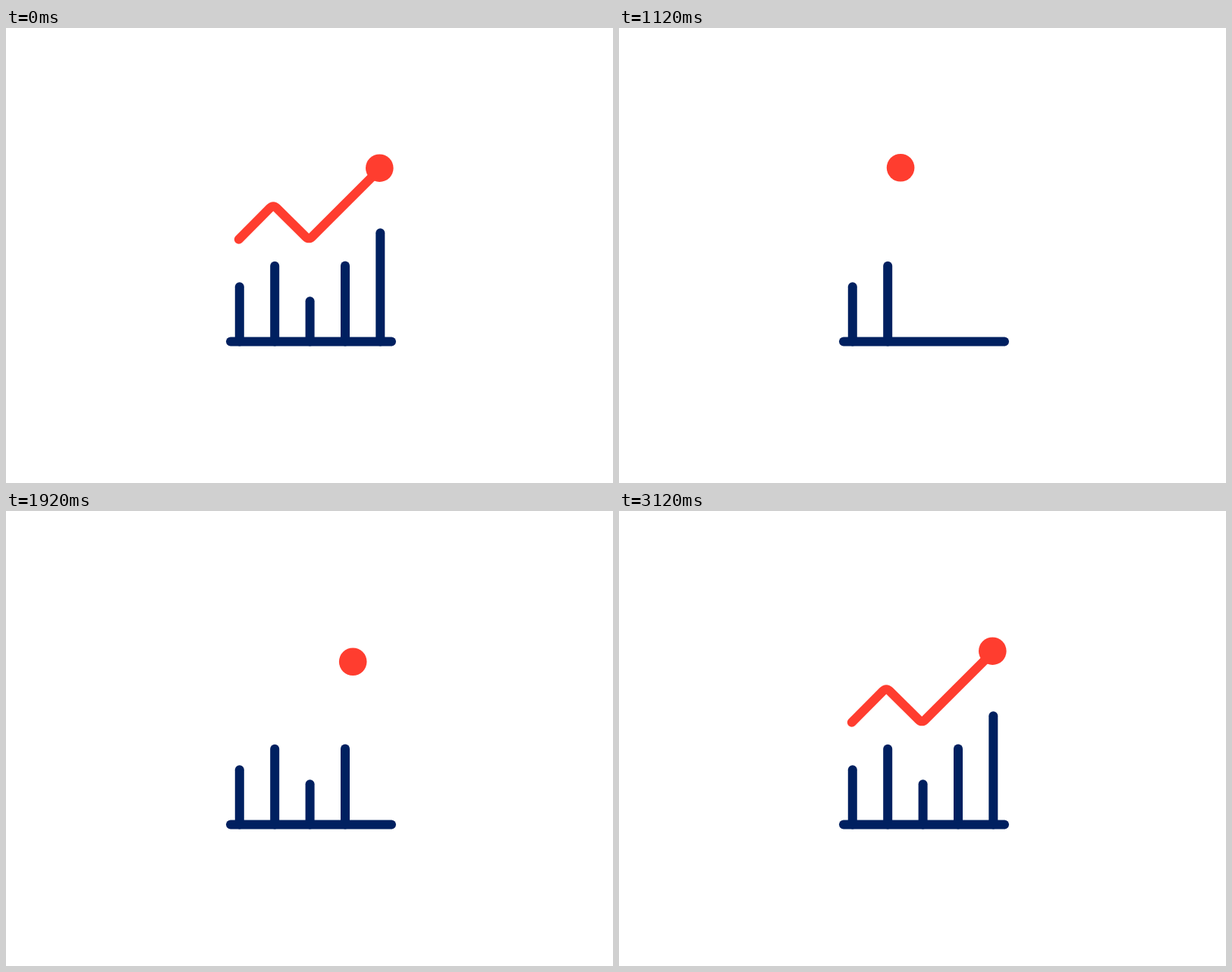
Animation, 800 px wide and 600 px high, one loop 3.48 s. Source, as an HTML page:

```html
<!DOCTYPE html>
<html lang="en">
<head>
<meta charset="utf-8">
<title>Growing chart</title>
<style>
  html, body { margin: 0; width: 100%; height: 100%; overflow: hidden; background: #fff; }
  svg { display: block; width: 800px; height: 600px; }
  line, path { fill: none; stroke-width: 12; stroke-linecap: round; }
  line { stroke: #002060; }
  path { stroke: #ff3d2f; }
  circle { fill: #ff3d2f; }
</style>
</head>
<body>
<svg viewBox="0 0 800 600">
  <g id="bars"></g>
  <line id="base" x1="296" y1="413.5" x2="508" y2="413.5"/>
  <path id="trend" pathLength="1" d="M492.3 186.4 L403.5 275.2 Q399.2 279.5 394.9 275.2 L356.6 237.3 Q352.3 233 348 237.3 L306.8 278.8"/>
  <circle id="ball" r="18.3"/>
</svg>
<script>
const LOOP = 3480, STEP = 40, START = 80, END = 3120;
const FLOOR = 413.5;
const $ = id => document.getElementById(id);

// Each bar: x, y of its upper end, time it starts to grow
const bars = [
  [307.8, 341.3, 400],
  [354.2, 313.7, 800],
  [400.6, 360.3, 1240],
  [447, 313.5, 1680],
  [493.3, 270.2, 2120]
].map(([x, top, start]) => {
  const el = document.createElementNS('http://www.w3.org/2000/svg', 'line');
  for (const [k, v] of Object.entries({ x1: x, x2: x, y1: FLOOR })) el.setAttribute(k, v);
  $('bars').append(el);
  return { el, top, start };
});

const linear = u => u;
const easeIn = p => u => u ** p;
const easeOut = p => u => 1 - (1 - u) ** p;
const fall = easeIn(1.89), rise = easeOut(3.37);

// Keys: time, value, easing used to arrive there
const ballX = [
  [360, 308.5], [520, 308.5], [600, 317.5], [840, 340.3], [960, 353.5], [1160, 375.5],
  [1400, 396.5], [1440, 397.2], [1720, 434.5], [1840, 447], [1920, 457.2], [2280, 492.3]
];
const ballY = [
  [360, -20], [520, 317, easeIn(1.6)],
  [700, 184.4, rise], [960, 289.5, fall],
  [1140, 184.2, rise], [1400, 336, fall],
  [1580, 184.2, easeOut(3.75)], [1840, 289.5, fall],
  [2020, 184.2, rise], [2280, 246.5, fall],
  [2600, 100.4, rise], [2760, 184.7, fall]
];

const clamp = u => Math.min(1, Math.max(0, u));
const progress = (t, start, length) => clamp((t - start) / length);

function at(keys, t) {
  if (t <= keys[0][0]) return keys[0][1];
  const i = keys.findIndex(key => key[0] >= t);
  if (i < 0) return keys[keys.length - 1][1];
  const [t0, v0] = keys[i - 1], [t1, v1, ease = linear] = keys[i];
  return v0 + (v1 - v0) * ease((t - t0) / (t1 - t0));
}

function show(el, visible) {
  el.style.visibility = visible ? 'visible' : 'hidden';
}

function draw(now) {
  let t = Math.floor((now % LOOP) / STEP) * STEP;
  if (t < START) t = END; // the loop opens on the finished chart

  const b = progress(t, START, 200);
  $('base').setAttribute('x2', 296 + 212 * b);
  show($('base'), b > 0);

  for (const { el, top, start } of bars) {
    const g = progress(t, start, 150);
    el.setAttribute('y2', FLOOR + (top - FLOOR) * g);
    show(el, g > 0);
  }

  const drawn = progress(t, 2760, 360);
  $('trend').setAttribute('stroke-dasharray', drawn < 1 ? `${drawn} 2` : 'none');
  show($('trend'), drawn > 0);

  $('ball').setAttribute('cx', at(ballX, t));
  $('ball').setAttribute('cy', at(ballY, t));
}

const origin = performance.now();
function tick() {
  draw(performance.now() - origin);
  requestAnimationFrame(tick);
}
tick();
</script>
</body>
</html>
```
